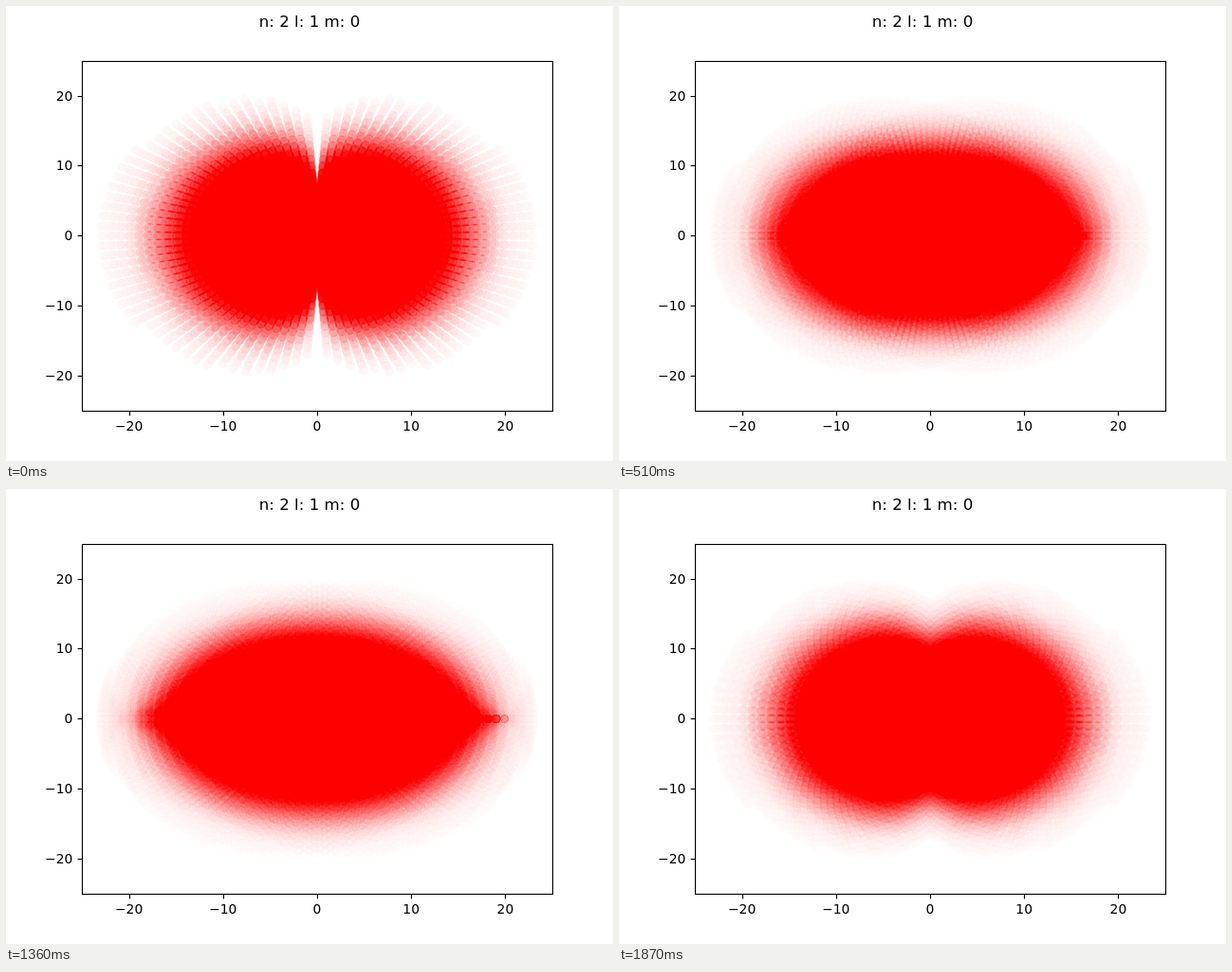
An HTML page with a canvas for the animation above (2.04 s loop, 640x480 px).

```html
<!DOCTYPE html>
<html lang="en">
<head>
<meta charset="utf-8">
<title>Orbital</title>
<style>
html, body { margin: 0; width: 100%; height: 100%; overflow: hidden; background: #fff; }
canvas { display: block; }
</style>
</head>
<body>
<canvas id="stage" width="640" height="480"></canvas>
<script>
const W = 640, H = 480, STEP = 170, STEPS = 12;
const CX = 328, CY = 242.4, SX = 9.92, SY = 7.392;   // plot origin, pixels per unit
const RADIUS = 25 / 6, HALF_LINE = 25 / 36;          // marker and half its outline
const ctx = document.getElementById('stage').getContext('2d');

// 8-bit blend of red over a green/blue value: blend[alpha * 256 + value]
const blend = new Uint8Array(65536);
for (let a = 0; a < 256; a++)
  for (let g = 0; g < 256; g++)
    blend[a * 256 + g] = Math.floor(255 * g * (256 - a) / (65280 + a));

// Radial grid of the orbital, with the opacity of each point
const points = [];
const AMPLITUDE = 100 * Math.sqrt(3 / (4 * Math.PI)) / (2 * Math.sqrt(6));
for (let r = 1; r < 25; r++)
  for (let j = 0; j < 50; j++)
    for (let i = 0; i < 100; i++) {
      const theta = j * Math.PI / 50, phi = i * Math.PI / 50;
      const psi = AMPLITUDE * r * Math.exp(-r / 2) * Math.abs(Math.cos(phi));
      const alpha = Math.round(255 * Math.min(1, psi));
      if (alpha) points.push({
        x: r * Math.sin(theta) * Math.cos(phi),
        y: r * Math.sin(theta) * Math.sin(phi),
        z: r * Math.cos(theta),
        alpha
      });
    }

const clamp = v => v < 0 ? 0 : v > 1 ? 1 : v;

function marker(buf, cx, cy, alpha) {
  const reach = RADIUS + HALF_LINE + 0.5;
  const x1 = Math.ceil(cx + reach), y1 = Math.ceil(cy + reach);
  for (let y = Math.floor(cy - reach); y < y1; y++)
    for (let x = Math.floor(cx - reach); x < x1; x++) {
      const at = y * W + x;
      if (!buf[at]) continue;
      const dx = x + 0.5 - cx, dy = y + 0.5 - cy;
      const edge = RADIUS + 0.5 - Math.sqrt(dx * dx + dy * dy);
      if (edge <= -HALF_LINE) continue;
      const fill = clamp(edge);
      const line = clamp(edge + HALF_LINE) - clamp(edge - HALF_LINE);
      const g = blend[Math.round(alpha * fill) * 256 + buf[at]];
      buf[at] = blend[Math.round(alpha * line) * 256 + g];
    }
}

function cloud(angle) {
  const buf = new Uint8Array(W * H).fill(255);
  const c = Math.cos(angle), s = Math.sin(angle);
  for (const p of points)
    marker(buf, CX + SX * (p.x * c + p.z * s), CY - SY * p.y, p.alpha);
  const image = new ImageData(W, H);
  buf.forEach((g, i) => image.data.set([255, g, g, 255], i * 4));
  return image;
}

function line(x1, y1, x2, y2) {
  ctx.beginPath();
  ctx.moveTo(x1, y1);
  ctx.lineTo(x2, y2);
  ctx.stroke();
}

function text(str, x, y, size, align) {
  ctx.font = size + 'px "DejaVu Sans", sans-serif';
  ctx.textAlign = align;
  ctx.fillText(str, x, y);
}

function axes() {
  ctx.strokeStyle = ctx.fillStyle = '#000';
  ctx.lineWidth = 10 / 9;
  for (let v = -20; v <= 20; v += 10) {
    const label = String(v).replace('-', '\u2212');
    const x = CX + v * SX, y = CY - v * SY;
    const tx = Math.round(x) + 0.5, ty = Math.round(y) + 0.5;
    line(tx, 427.5, tx, 432.4);
    line(75.6, ty, 80.5, ty);
    text(label, x, 448, 13.889, 'center');
    text(label, 70.3, Math.round(y + 5), 13.889, 'right');
  }
  ctx.strokeRect(80.5, 58.5, 496, 369);
  text('n: 2 l: 1 m: 0', 320, 22, 16.667, 'center');
}

// Half a turn in 15 degree steps; the second quarter mirrors the first
const views = [];
for (let k = 0; k <= STEPS / 2; k++) views.push(cloud(k * Math.PI / STEPS));

const start = performance.now();
let shown = -1;
function draw() {
  const k = Math.floor((performance.now() - start) / STEP) % STEPS;
  if (k !== shown) {
    shown = k;
    ctx.putImageData(views[Math.min(k, STEPS - k)], 0, 0);
    axes();
  }
  requestAnimationFrame(draw);
}
draw();
</script>
</body>
</html>
```
